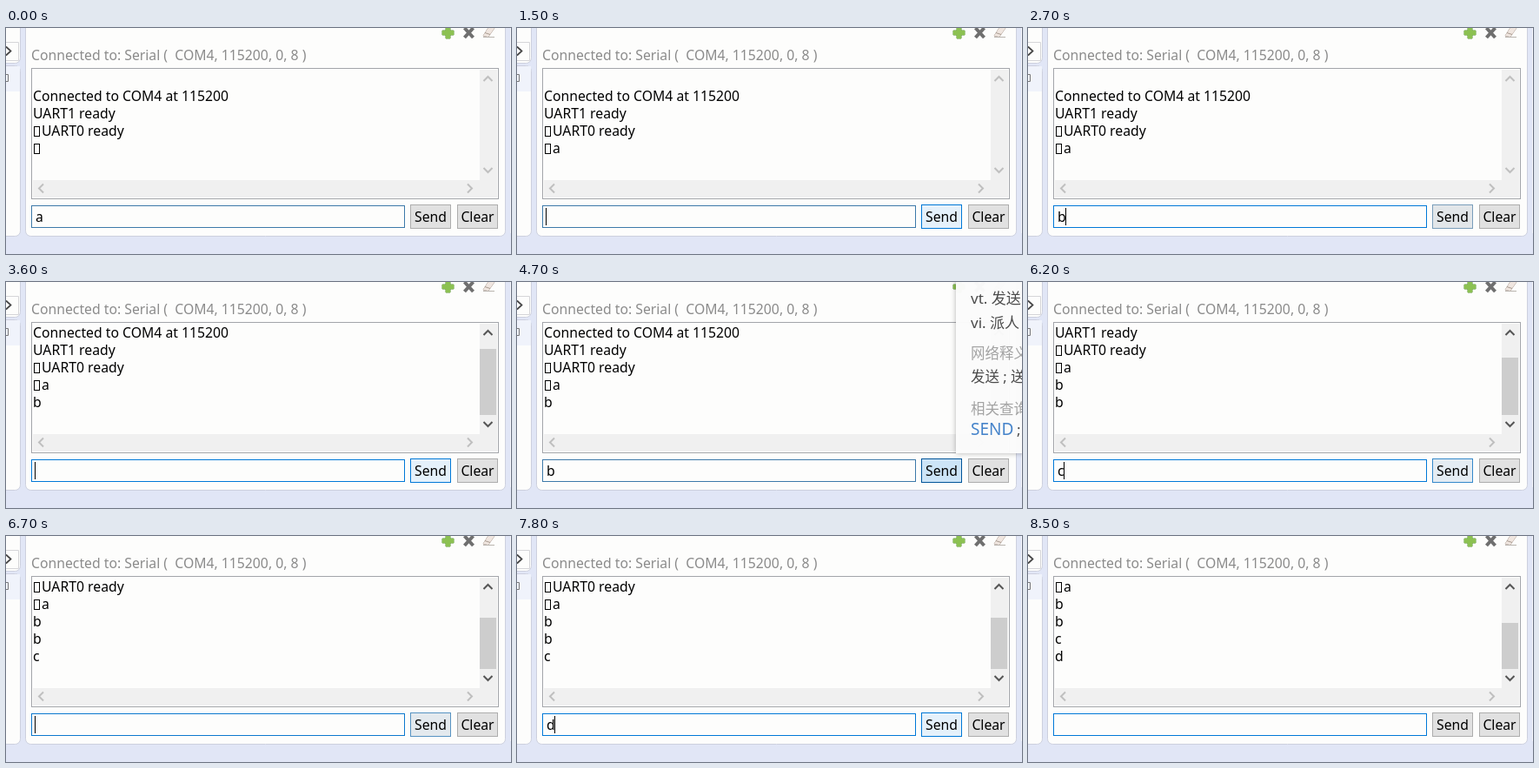
Recreate the animation shown at these times as an HTML page with a canvas. Size 581 px wide and 260 px high, loop 8.9 s.

```html
<!DOCTYPE html>
<html lang="en">
<head>
<meta charset="utf-8">
<title>Serial terminal</title>
<style>
  html, body { margin: 0; width: 100%; height: 100%; overflow: hidden; background: #e1e6f6; }
  canvas { display: block; }
</style>
</head>
<body>
<canvas id="stage" width="581" height="260"></canvas>
<script>
const ctx = document.getElementById('stage').getContext('2d');
const LOOP = 8900, STEP = 100;
const FAMILY = '"Noto Sans", "Noto Sans CJK SC", "Noto Sans CJK", sans-serif';
const PAPER = '#fdfdfc', BOX = '\u25af';
const MESSAGES = 'abbcd';

// [step, changed values]; one step is 100 ms
const events = [
  [0, { input: 'a', focus: .5, caret: 0, sent: 0, hover: 0, press: 0, popup: 0 }],
  [1, { focus: 0 }],
  [3, { hover: .3 }], [4, { hover: .7 }], [5, { hover: 1 }],
  [15, { input: '', sent: 1, caret: 1, focus: .5 }],
  [16, { focus: 1, popup: .5 }],
  [17, { popup: .97, hover: .8 }],
  [18, { popup: .5, hover: .4 }],
  [19, { popup: 0, hover: 0 }],
  [21, { caret: 0 }],
  [27, { input: 'b', caret: 1, hover: .3 }], [28, { hover: .7 }], [29, { hover: 1 }],
  [31, { caret: 0 }],
  [34, { press: 1, focus: .5 }],
  [35, { press: 0, input: '', sent: 2, caret: 1 }],
  [36, { focus: 1 }],
  [41, { caret: 0, popup: .6 }],
  [42, { input: 'b', caret: 1, popup: .97 }],
  [47, { press: 1, caret: 0, focus: .5 }],
  [48, { focus: 0 }],
  [49, { press: 0, input: '', sent: 3, caret: 1, focus: .5 }],
  [50, { focus: 1 }],
  [53, { hover: .6, popup: .95 }],
  [54, { hover: .1, popup: .92 }],
  [55, { hover: 0, popup: 0, caret: 0 }],
  [58, { input: 'c', caret: 1 }],
  [61, { hover: .3 }], [62, { hover: .7 }], [63, { hover: 1 }],
  [64, { press: 1, caret: 0, focus: .5 }],
  [65, { focus: 0 }],
  [66, { press: 0, input: '', sent: 4, caret: 1, focus: .5 }],
  [67, { hover: .5, focus: .9 }], [68, { hover: .2, focus: 1 }], [69, { hover: 0 }],
  [72, { caret: 0 }],
  [74, { input: 'd', caret: 1 }],
  [76, { hover: .3 }], [77, { hover: .7 }], [78, { hover: 1 }],
  [79, { press: 1, caret: 0, focus: .5 }],
  [80, { press: 0, input: '', sent: 5, caret: 1 }],
  [81, { hover: .5, focus: 1 }], [82, { hover: 0 }],
  [85, { caret: 0 }]
];

function stateAt(step) {
  const state = {};
  for (const [at, change] of events) if (at <= step) Object.assign(state, change);
  return state;
}

function mix(a, b, k) {
  return `rgb(${a.map((v, i) => Math.round(v + (b[i] - v) * k)).join()})`;
}

function rect(x, y, w, h, fill) {
  ctx.fillStyle = fill;
  ctx.fillRect(x, y, w, h);
}

function frame(x, y, w, h, fill, border) {
  rect(x, y, w, h, border);
  rect(x + 1, y + 1, w - 2, h - 2, fill);
}

function text(str, x, y, color = '#000', size = 15.75) {
  ctx.font = `${size}px ${FAMILY}`;
  ctx.fillStyle = color;
  ctx.fillText(str, x, y);
}

function path(points, color, width, close) {
  ctx.beginPath();
  points.forEach(([x, y]) => ctx.lineTo(x, y));
  if (close) ctx.closePath();
  ctx.strokeStyle = color;
  ctx.lineWidth = width;
  ctx.stroke();
}

function panel(x, y, w, h, r, fill = PAPER) {
  ctx.beginPath();
  ctx.roundRect(x + .5, y + .5, w - 1, h - 1, r);
  ctx.fillStyle = fill;
  ctx.fill();
  ctx.strokeStyle = '#cdd0de';
  ctx.lineWidth = 1;
  ctx.stroke();
}

// Arrow head pointing along (dx, dy)
function arrow(x, y, dx, dy, color) {
  path([
    [x - dx * 2.5 - dy * 5, y - dy * 2.5 - dx * 5],
    [x + dx * 2.5, y + dy * 2.5],
    [x - dx * 2.5 + dy * 5, y - dy * 2.5 + dx * 5]
  ], color, 2);
}

function drawIcons() {
  const plus = [[506, -2], [511, -2], [511, 3], [515, 3], [515, 8], [511, 8],
    [511, 12], [506, 12], [506, 8], [502, 8], [502, 3], [506, 3]];
  path(plus, '#5d9636', 1, true);
  ctx.fillStyle = '#8cc152';
  ctx.fill();
  path([[527.5, 0], [537.5, 11]], '#6f6f6f', 4);
  path([[537.5, 0], [527.5, 11]], '#6f6f6f', 4);
  path([[549, 9], [556, -2], [562, 0], [555, 10]], '#a89a90', 1, true);
  ctx.fillStyle = '#f0e6e0';
  ctx.fill();
  path([[551, 5.5], [557, 7.5]], '#a89a90', 1);
  path([[549, 10.5], [562, 10.5]], '#b9b4ae', 1);
}

function drawWindow() {
  rect(0, 0, 581, 260, '#e1e6f6');
  panel(-20, -20, 37, 61, 6);
  panel(-20, 43, 37, 197, 6);
  rect(0, 44, 16, 29, '#f0f3fb');
  path([[0, 16.5], [14.5, 16.5], [14.5, 37.5], [0, 37.5]], '#d5d5d8', 1);
  path([[0, 21.5], [5.5, 26.5], [0, 31.5]], '#444', 1.7);
  path([[0, 53.5], [2.5, 53.5], [2.5, 61.5], [0, 61.5]], '#777', 1);
  panel(22, -20, 553, 260, 6);
  rect(580, 0, 1, 236, '#f3f5fb');
  drawIcons();
  text('Connected to: Serial (  COM4, 115200, 0, 8 )', 29, 37, '#8b8b8b');
}

function drawLog(sent) {
  const overflow = Math.max(0, sent - 1);
  const lines = ['', 'Connected to COM4 at 115200', 'UART1 ready', BOX + 'UART0 ready',
    BOX + MESSAGES.slice(0, Math.min(sent, 1)), ...MESSAGES.slice(1, Math.max(1, sent))];

  frame(29, 46, 538, 151, PAPER, '#a3a5aa');
  lines.slice(-5).forEach((line, i) => {
    const y = 64 + i * 20;
    if (line[0] === BOX) {
      ctx.strokeStyle = '#000';
      ctx.lineWidth = 1;
      ctx.strokeRect(32.5, y - 10.5, 6, 11);
      text(line.slice(1), 41, y);
    } else {
      text(line, 31, y);
    }
  });

  rect(545, 48, 20, 147, '#f0f0f0');
  rect(31, 175, 534, 20, '#f0f0f0');
  if (overflow) {
    const h = Math.round(88.8 * 5.94 / (5.94 + overflow));
    rect(545, 153 - h, 19, h, '#cdcdcd');
  }
  const active = overflow ? '#555' : '#bfbfbf';
  arrow(554.5, 58.5, 0, -1, active);
  arrow(554.5, 163.5, 0, 1, active);
  arrow(40.5, 184.5, -1, 0, '#bfbfbf');
  arrow(533.5, 184.5, 1, 0, '#bfbfbf');
}

function drawInput({ input, focus, caret }) {
  frame(29, 204, 430, 26, PAPER, mix([122, 122, 122], [0, 120, 215], focus));
  text(input, 33.9, 222.5);
  if (caret) rect(Math.floor(33.9 + ctx.measureText(input).width), 207, 1, 20, '#000');
}

function button(label, x, hover, press) {
  const fill = press ? '#cce4f7' : mix([225, 225, 225], [229, 241, 251], hover);
  const border = press ? '#005499' : mix([173, 173, 173], [0, 120, 215], hover);
  frame(x, 203, 47, 28, fill, border);
  ctx.textAlign = 'center';
  text(label, x + 23.5, 223);
  ctx.textAlign = 'left';
}

function drawPopup(alpha) {
  if (!alpha) return;
  ctx.save();
  ctx.globalAlpha = alpha;
  ctx.shadowColor = 'rgba(0,0,0,.3)';
  ctx.shadowBlur = 6;
  rect(505, -20, 100, 217, '#fdfdfd');
  ctx.shadowColor = 'transparent';
  text('vt. 发送', 522, 25, '#444', 17);
  text('vi. 派人', 522, 53, '#444', 17);
  text('网络释义', 522, 88, '#a0a0a0', 16.5);
  text('发送 ; 送', 522, 115, '#444', 16.5);
  text('相关查询', 522, 152, '#a0a0a0', 16.5);
  text('SEND', 522, 176, '#3f7fc8', 19);
  text(';', 575, 176, '#444', 17);
  ctx.restore();
}

function draw(now) {
  const state = stateAt(Math.floor((now % LOOP) / STEP));
  drawWindow();
  drawLog(state.sent);
  drawInput(state);
  button('Send', 465, state.hover, state.press);
  button('Clear', 519, 0, 0);
  drawPopup(state.popup);
}

const start = performance.now();
function tick() {
  draw(performance.now() - start);
  requestAnimationFrame(tick);
}
tick();
</script>
</body>
</html>
```
